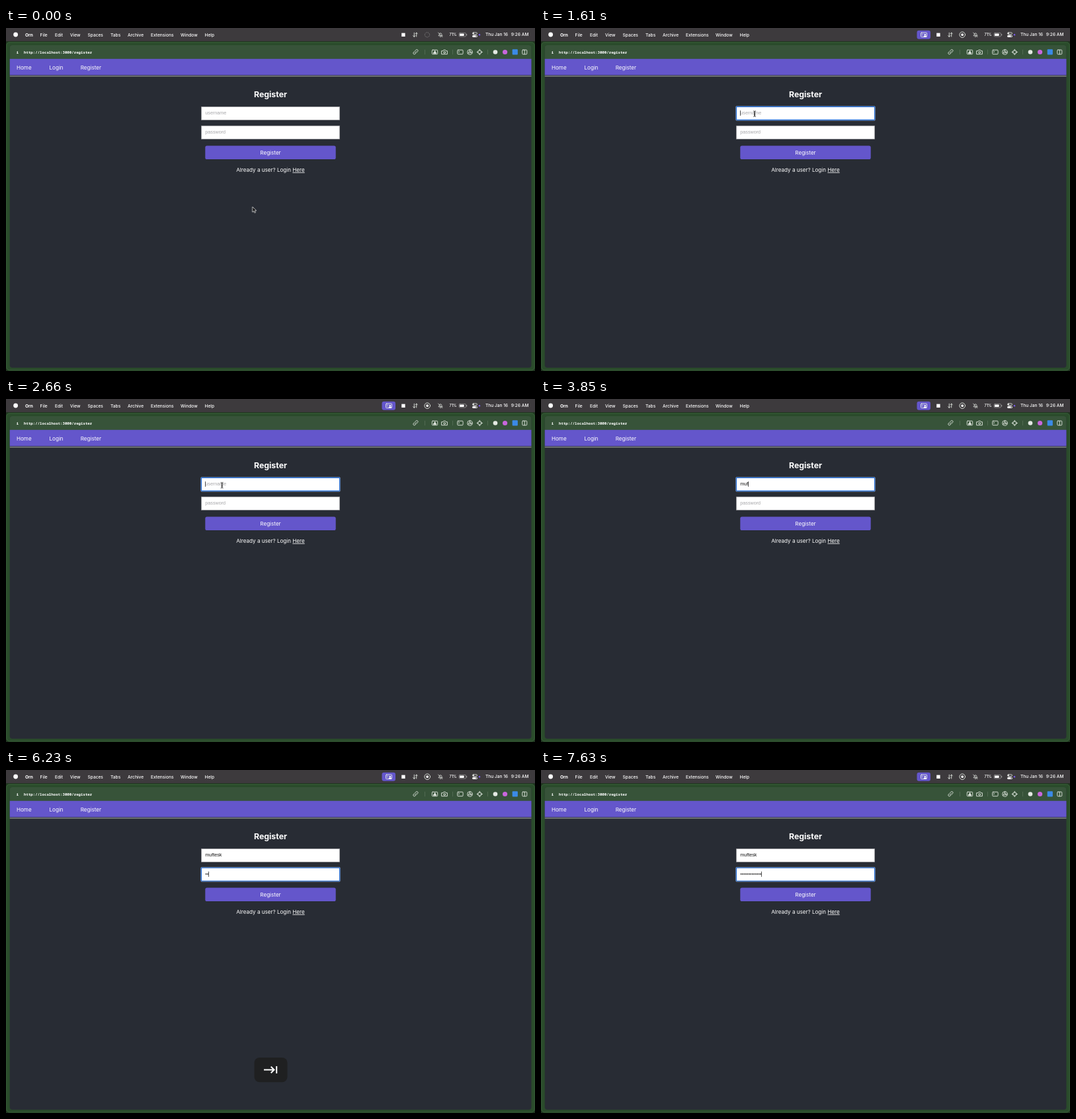
Write an HTML page that moves like this. It is 800x520 px and loops after 8 s.

```html
<!DOCTYPE html>
<html lang="en">
<head>
<meta charset="utf-8">
<title>Register</title>
<style>
  html, body { margin: 0; width: 100%; height: 100%; overflow: hidden; background: #282c34; }
  svg { display: block; width: 800px; height: 520px; }
  text { font-family: Inter, "Open Sans", sans-serif; fill: #fff; }
  .menu text { font-size: 6.6px; font-weight: 500; }
  .nav text, .body { font-size: 8.1px; }
  .field text { font: 7.2px "Liberation Sans", Arial, sans-serif; }
  .field .hint { fill: #a6a6a9; }
  .field .typed { fill: #111; }
  .line { fill: none; stroke: #e4e9e3; stroke-width: .9; stroke-linecap: round; stroke-linejoin: round; }

  #pointer { animation: travel 8s infinite; }
  #arrow { animation: arrow 8s step-end infinite; }
  #beam { animation: beam 8s step-end infinite; }
  #spinner { animation: spinner 8s step-end infinite; }
  #recording { animation: recording 8s step-end infinite; }
  #key { animation: key 8s linear infinite; }

  @keyframes travel {
    0%, .5% { transform: translate(372.7px, 271px); animation-timing-function: ease-in-out; }
    8.75% { transform: translate(290px, 124px); }
    11.4% { transform: translate(290px, 124px); animation-timing-function: linear; }
    12.25% { transform: translate(291px, 123.2px); animation-timing-function: ease-in-out; }
    18.4%, 20.1% { transform: translate(323px, 130px); animation-timing-function: ease-out; }
    25%, 100% { transform: translate(326.6px, 130.7px); }
  }
  @keyframes arrow { 0% { opacity: 1; } 13.2%, 100% { opacity: 0; } }
  @keyframes beam { 0% { opacity: 0; } 13.2% { opacity: 1; } 40.25%, 100% { opacity: 0; } }
  @keyframes spinner { 0% { opacity: 1; } 4.4%, 100% { opacity: 0; } }
  @keyframes recording { 0% { opacity: 0; } 4.4%, 100% { opacity: 1; } }
  @keyframes key {
    0%, 70.8% { opacity: 0; }
    71.75%, 87.4% { opacity: 1; }
    93.6%, 100% { opacity: 0; }
  }
</style>
</head>
<body>
<svg viewBox="0 0 800 520">
  <!-- desktop and window -->
  <rect width="800" height="520" fill="#1f331f"/>
  <rect y="21" width="800" height="498.500" rx="5" fill="#2a4b2b"/>
  <rect x=".9" y="21.900" width="798.200" height="496.800" rx="4.500" fill="none" stroke="#3a613a" stroke-width=".8"/>
  <rect x="5.700" y="26" width="788.800" height="489" rx="4" fill="#282c34"/>
  <path d="M5.700 47V30a4 4 0 0 1 4-4H790.500a4 4 0 0 1 4 4V47Z" fill="#375339"/>

  <!-- menu bar -->
  <rect width="800" height="20" fill="#3d3a3d"/>
  <g class="menu">
    <circle cx="14.600" cy="10" r="3.400" fill="#fff"/>
    <text x="29" y="12.600" style="font-weight:700">Orn</text>
    <text x="51.600" y="12.600">File</text>
    <text x="74" y="12.600">Edit</text>
    <text x="97" y="12.600">View</text>
    <text x="123.500" y="12.600">Spaces</text>
    <text x="158" y="12.600">Tabs</text>
    <text x="184" y="12.600">Archive</text>
    <text x="219" y="12.600">Extensions</text>
    <text x="264" y="12.600">Window</text>
    <text x="300.500" y="12.600">Help</text>
    <text x="670.500" y="12.300" style="font-size:5.700px">71%</text>
    <text x="725" y="12.400">Thu Jan 16</text>
    <text x="790.500" y="12.400" text-anchor="end">9:26 AM</text>
  </g>

  <g id="spinner">
    <circle cx="637" cy="10.300" r="3.600" class="line" stroke-dasharray=".1 2.160" style="stroke:#aaa"/>
  </g>
  <g id="recording">
    <rect x="568.500" y="3.800" width="20.500" height="13" rx="3" fill="#6456cb"/>
    <rect x="574.500" y="7" width="9" height="6.600" rx="1" class="line"/>
    <circle cx="580.800" cy="9.900" r="1.200" fill="#fff"/>
    <path d="M578.500 13.600a2.300 2.300 0 0 1 4.600 0Z" fill="#fff"/>
    <path d="M576 9h2M576 11h1.500" class="line" style="stroke-width:.7"/>
    <circle cx="637.200" cy="10.200" r="4.300" class="line"/>
    <rect x="635.500" y="8.500" width="3.400" height="3.400" rx=".8" fill="#fff"/>
  </g>
  <rect x="598.200" y="7.600" width="5.400" height="5.400" fill="#fff"/>
  <path d="M617.300 7.200v6.200m-1.700-1.700 1.700 1.700 1.500-1.700M620.700 13V7.200m-1.400 1.400 1.400-1.400 1.600 1.400" class="line"/>
  <path d="M654.300 11.500q1-.8 1-2.300a1.800 1.800 0 0 1 3.500 0q0 1.500 1 2.300ZM656.300 13.200h1.400M653.700 7l6.200 6.600" class="line" style="stroke-width:.8"/>
  <rect x="685" y="7.400" width="10.600" height="5.700" rx="1.600" class="line" style="stroke-width:.6;stroke:#aaa"/>
  <rect x="686" y="8.400" width="6.700" height="3.700" rx=".8" fill="#fff"/>
  <path d="M696.700 9.400v1.700" class="line" style="stroke:#aaa"/>
  <rect x="705.500" y="6.800" width="7" height="2.800" rx="1.400" class="line" style="stroke-width:.8"/>
  <rect x="705.200" y="10.800" width="7.600" height="3.200" rx="1.600" fill="#fff"/>
  <circle cx="706.900" cy="8.200" r=".9" fill="#fff"/>
  <circle cx="711.100" cy="12.400" r=".9" fill="#3d3a3d"/>
  <circle cx="716" cy="10.300" r="1.200" fill="#7a5cf0"/>

  <!-- address bar -->
  <text x="15.500" y="38.700" style="font:700 6px 'Noto Sans Mono',monospace">i</text>
  <text x="27" y="38.500" style="font:600 5.740px 'Noto Sans Mono',monospace">http://localhost:3000/register</text>
  <g class="line">
    <path d="M618.300 37.800 620.400 35.700M617.800 35.500l-1.500 1.500a1.700 1.700 0 0 0 2.400 2.400l1.500-1.500M618.700 34.600l1.500-1.500a1.700 1.700 0 0 1 2.400 2.400l-1.500 1.500"/>
    <rect x="644.300" y="33.300" width="8.400" height="6.400" rx="1"/>
    <path d="M646.400 38.300a2.100 2.100 0 0 1 4.200 0Z" fill="#e4e9e3"/>
    <circle cx="648.500" cy="35.300" r=".6" fill="#e4e9e3"/>
    <path d="M659 34.700h2l.8-1.400h2.800l.8 1.400h2v5h-8.400Z"/>
    <circle cx="663.200" cy="37" r="1.400"/>
    <rect x="682.700" y="33.300" width="8.400" height="6.400" rx="1"/>
    <path d="m684.500 35 1.200 1-1.200 1"/>
    <circle cx="701.500" cy="36.500" r="3.800"/>
    <circle cx="701.500" cy="36.500" r="1.500"/>
    <path d="M701.500 32.700v2.300M698.200 38.400l2-1.100M704.800 38.400l-2-1.100"/>
    <circle cx="716.300" cy="36.500" r="2.900"/>
    <path d="M716.300 32.300v2.400M716.300 38.300v2.400M712.100 36.500h2.400M718.100 36.500h2.400"/>
    <rect x="780.800" y="33.200" width="7" height="6.600" rx="1"/>
    <path d="M784.300 33.200v6.600"/>
    <path d="M633.500 33.200v6.600M675.500 33.200v6.600M728.500 33.200v6.600" style="stroke:#5d755e;stroke-width:.7"/>
  </g>
  <circle cx="740" cy="36.500" r="3.300" fill="#e4e9e3"/>
  <circle cx="754.600" cy="36.500" r="3.600" fill="#c866dc"/>
  <rect x="765.700" y="32.300" width="8.200" height="8.200" rx="1" fill="#3b8ae6"/>

  <!-- page -->
  <g class="nav">
    <rect x="5.700" y="46.800" width="788.800" height="24.800" fill="#6456cb"/>
    <rect x="5.700" y="71.600" width="788.800" height=".8" fill="#3c3a5c"/>
    <rect x="5.700" y="72.400" width="788.800" height="1.300" fill="#8b9189"/>
    <text x="16" y="62.500">Home</text>
    <text x="65.500" y="62.500">Login</text>
    <text x="112.700" y="62.500">Register</text>
  </g>
  <text x="400" y="105.300" text-anchor="middle" style="font-size:12.300px;font-weight:700">Register</text>

  <g class="field">
    <rect x="295.300" y="119.300" width="209.400" height="20.200" fill="#fff" stroke="#85868a" stroke-width=".6"/>
    <rect x="295.300" y="148.200" width="209.400" height="20.200" fill="#fff" stroke="#85868a" stroke-width=".6"/>
    <g id="ring" fill="none">
      <rect x="294.600" y="118.600" width="210.800" height="21.600" rx="1.400" stroke="#b4cbec" stroke-width=".6"/>
      <rect x="295.400" y="119.400" width="209.200" height="20" rx=".8" stroke="#1763d2" stroke-width="1.100"/>
    </g>
    <text id="userHint" class="hint" x="301.300" y="131.300">username</text>
    <text id="passHint" class="hint" x="301.300" y="160.200">password</text>
    <text id="user" class="typed" x="301.300" y="131.300"></text>
    <path id="dots" fill="none" stroke="#111" stroke-width="1.750" stroke-linecap="round"/>
    <rect id="caret" y="125" width=".7" height="8" fill="#111"/>
  </g>

  <rect x="301.300" y="178.500" width="197.400" height="20.500" rx="2.600" fill="#6456cb"/>
  <text class="body" x="400" y="191.500" text-anchor="middle">Register</text>
  <text class="body" x="400" y="217.800" text-anchor="middle">Already a user? Login <tspan text-decoration="underline">Here</tspan></text>

  <!-- key press badge -->
  <g id="key">
    <rect x="375.500" y="436" width="50" height="37.300" rx="8" fill="#1f2021"/>
    <path d="M390 454.500h15.500M400.700 449.700l4.800 4.800-4.800 4.800M409.200 449v11" fill="none" stroke="#fff" stroke-width="2"/>
  </g>

  <g id="pointer">
    <path id="arrow" d="M0 0V8.200L1.900 6.500 3.200 9.300 4.600 8.700 3.400 5.900H5.900Z" fill="#111" stroke="#fff" stroke-width=".7" stroke-linejoin="round"/>
    <path id="beam" d="M-1.800-4.300Q0-4.300 0-3V3Q0 4.300-1.800 4.300M1.800-4.300Q0-4.300 0-3V3Q0 4.300 1.800 4.300M-1 .9H1" fill="none" stroke="#222" stroke-width=".9"/>
  </g>
</svg>
<script>
  const LOOP = 8000, BLINK = 525, FOCUS = 1610, TAB = 5670;
  const LEFT = 301.3, PITCH = 2.46, ROW = 28.9;
  const NAME = "muftesk";
  const nameKeys = [3220, 3570, 3850, 4060, 4230, 5040, 5180];
  const passKeys = [5950, 6090, 6300, 6440, 6650, 6720, 6790, 7000, 7140, 7210, 7350, 7490, 7630];
  const events = [FOCUS, ...nameKeys, TAB, ...passKeys];

  const el = id => document.getElementById(id);
  const show = (node, on) => node.setAttribute("visibility", on ? "visible" : "hidden");
  const [ring, user, dots, caret, userHint, passHint] =
    ["ring", "user", "dots", "caret", "userHint", "passHint"].map(el);
  const passed = (keys, t) => keys.filter(k => k <= t).length;

  function draw(t) {
    const letters = passed(nameKeys, t), bullets = passed(passKeys, t);
    const inPass = t >= TAB, shift = inPass ? `translate(0 ${ROW})` : "";

    user.textContent = NAME.slice(0, letters);
    show(userHint, !letters);
    show(passHint, !bullets);

    let path = "";
    for (let i = 0; i < bullets; i++) path += `M${LEFT + 1.25 + i * PITCH} 157.7h.01`;
    dots.setAttribute("d", path);

    ring.setAttribute("transform", shift);
    show(ring, t >= FOCUS);

    const width = inPass ? bullets * PITCH : letters ? user.getComputedTextLength() : 0;
    const last = events[passed(events, t) - 1];
    caret.setAttribute("x", LEFT + width);
    caret.setAttribute("transform", shift);
    show(caret, t >= FOCUS && Math.floor((t - last) / BLINK) % 2 === 0);
  }

  const start = performance.now();
  function tick() {
    draw((performance.now() - start) % LOOP);
    requestAnimationFrame(tick);
  }
  tick();
</script>
</body>
</html>
```
